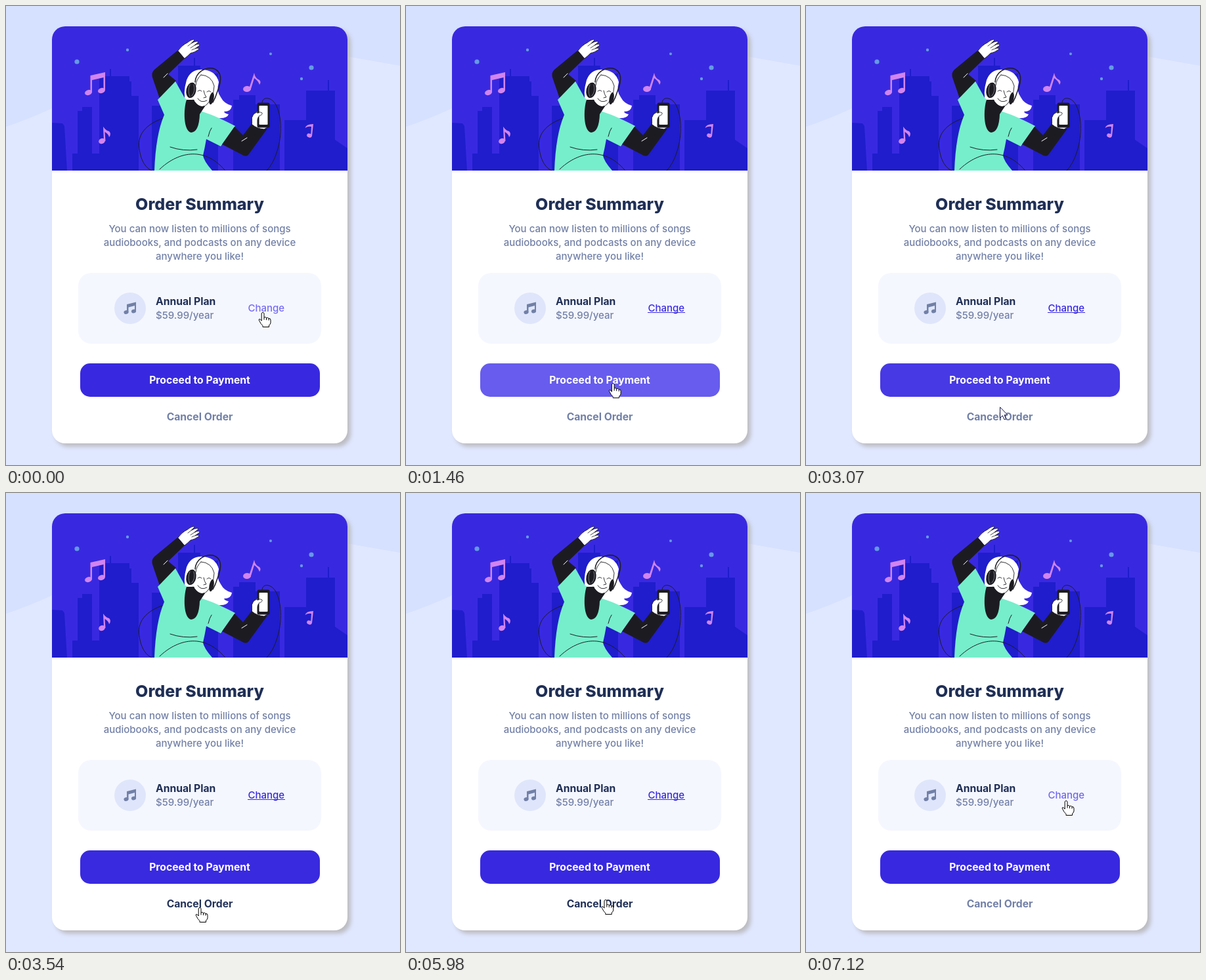
Animation of 600 by 700 pixels, one loop 8530 ms. Source, as an HTML page with a canvas:

```html
<!DOCTYPE html>
<html lang="en">
<head>
<meta charset="utf-8">
<title>Order Summary</title>
<style>
html, body { margin: 0; width: 100%; height: 100%; overflow: hidden; background: #e0e8ff; }
canvas { display: block; }
</style>
</head>
<body>
<canvas id="stage" width="600" height="700"></canvas>
<script>
const ctx = document.getElementById('stage').getContext('2d');
const LOOP = 8530, STEP = 1000 / 15, FADE_RATE = .38;
const BLUE = '#3829e0', VIOLET = '#766cf1', NAVY = '#1f2f56', SLATE = '#7280a7';
const INK = '#1d1b22', WHITE = '#ffffff', TEAL = '#76eecb', PINK = '#d284f0';

function shape(d, fill, stroke, width = 1) {
  const path = new Path2D(d);
  if (fill) { ctx.fillStyle = fill; ctx.fill(path); }
  if (stroke) { ctx.strokeStyle = stroke; ctx.lineWidth = width; ctx.stroke(path); }
}

const line = (d, width = 1) => shape(d, null, INK, width);

function box(x, y, w, h, r, fill) {
  ctx.beginPath();
  ctx.roundRect(x, y, w, h, r);
  ctx.fillStyle = fill;
  ctx.fill();
}

function oval(x, y, rx, ry, tilt, fill) {
  ctx.beginPath();
  ctx.ellipse(x, y, rx, ry, tilt, 0, Math.PI * 2);
  ctx.fillStyle = fill;
  ctx.fill();
}

function text(str, x, y, color, font, align = 'center') {
  ctx.font = font + ' Inter, sans-serif';
  ctx.textAlign = align;
  ctx.fillStyle = color;
  ctx.fillText(str, x, y);
}

const TITLE = '800 25px', BODY = '500 15px', BOLD = '700 15.7px';

function mix(from, to, k) {
  const part = (hex, i) => parseInt(hex.slice(i, i + 2), 16);
  return `rgb(${[1, 3, 5].map(i => Math.round(part(from, i) + (part(to, i) - part(from, i)) * k))})`;
}

// Pointer path: each move slows down towards its end, some bend towards a point
const HOME = [392, 468];
const MOVES = [
  { at: 1060, for: 700, to: [294, 588], bend: [360, 560] },
  { at: 2860, for: 660, to: [296, 633] },
  { at: 3790, for: 170, to: [297, 642] },
  { at: 4440, for: 100, to: [297, 636] },
  { at: 5966, for: 663, to: [391, 474], bend: [335, 562] },
  { at: 6805, for: 55, to: [397, 470] }
];

function pointerAt(time) {
  let pos = HOME;
  for (const move of MOVES) {
    if (time < move.at) break;
    const k = 1 - (1 - Math.min(1, (time - move.at) / move.for)) ** 2;
    const from = pos;
    const mid = move.bend || from.map((v, i) => (v + move.to[i]) / 2);
    pos = from.map((v, i) => (1 - k) ** 2 * v + 2 * k * (1 - k) * mid[i] + k * k * move.to[i]);
  }
  return pos;
}

function hoveredAt(y) {
  if (y < 473) return 'change';
  if (y >= 545 && y <= 596) return 'button';
  if (y >= 614 && y <= 640) return 'cancel';
  return null;
}

// Replays the hover fades from the start of the loop up to the given time
function stateAt(time) {
  const glow = { change: 1, button: 0, cancel: 0 };
  let pos, hovered;
  for (let step = 0; step <= Math.floor((time + 21) / STEP); step++) {
    pos = pointerAt(step * STEP);
    hovered = hoveredAt(pos[1]);
    for (const name in glow) glow[name] += ((name === hovered) - glow[name]) * FADE_RATE;
  }
  return { pos, hovered, glow };
}

function drawBackdrop() {
  ctx.fillStyle = '#e0e8ff';
  ctx.fillRect(0, 0, 600, 700);
  shape('M0 0H600V91Q560 84 520 77L70 156Q36 172 0 184Z', '#d6e1ff');
  ctx.save();
  ctx.shadowColor = '#bcbcc2';
  ctx.shadowBlur = 6;
  ctx.shadowOffsetX = ctx.shadowOffsetY = 5;
  box(70, 31, 450, 636, 20, WHITE);
  ctx.restore();
}

function drawSkyline() {
  box(70, 31, 450, 220, 0, BLUE);
  shape(`M70 251V178L86 179 89 183 93 251H101V225H109V160H116V154H131V225H142V107H158V96H160V107H188
    V115H191V137H202V251H222V152H262V91H286V79H288V91H296V103H323V251H346V143H355V136H380V150H417
    V251H424V174H457V129H490V113H492V129H501V204L520 217V251Z`, '#1f1dcc');
  for (const [x, y, r] of [[108, 85, 3.6], [185, 67, 2.2], [403, 73, 2], [465, 94, 3.6], [450, 111, 2.2]])
    oval(x, y, r, r, 0, '#659ae6');
}

function drawNotes() {
  oval(125.5, 132, 5.6, 4, -.3, PINK);
  oval(145.5, 129, 5.6, 4, -.3, PINK);
  shape('M128.500 106L151 101V128H148.500V109L131 113V132H128.500Z', PINK);
  oval(367, 126.5, 6, 4.4, -.1, PINK);
  shape('M370 126L378 102Q379 110 386 113Q389 116 386 120Q384 114 378 110L372.5 128Z', PINK);
  oval(146, 206, 5, 4, -.4, PINK);
  shape('M149 206L148 184Q152 190 157 191Q161 195 157 200Q156 195 150.5 192L151.5 206Z', PINK);
  oval(462, 197.5, 4, 3, .4, PINK);
  shape('M464 198L465 184Q460 183 455.5 186Q457 180 468 180L466 198Z', PINK);
}

function drawDancer() {
  ctx.lineCap = ctx.lineJoin = 'round';
  line('M252 168C222 174 201 190 202.5 213C204 234 212 247 222 251');
  line('M390 148C390 138 403 138 410 149C420 165 421 196 413 221Q407 241 397 251');

  // Raised arm
  shape('M261 68L226 97Q221 102 223 109L234 141 259 114 247 104 272 80Z', INK);
  shape('M240 109L246 103', null, WHITE);
  shape(`M262 68Q269 59 276 56Q285 49 287 52L282 57Q291 52 293 55L287 60Q295 56 295 60L288 65
    Q294 63 294 66Q287 71 281 72Q277 76 272 80Z`, WHITE, INK, .9);
  line('M282 57L277 61M287 60L281 64M288 65L283 67', .8);

  // Hair, shirt and collar
  shape(`M297 97Q281 97 275 113Q269 133 274 150L296 162Q309 177 326 171Q337 171 339 165
    Q333 164 332 161Q343 161 344 152Q332 149 327 139Q320 130 324 116Q319 97 297 97Z`, WHITE);
  shape(`M258 115L231 143 241 166Q228 196 226 251H314Q301 236 300 228Q303 215 305 203L327 214 349 183
    Q330 173 313 166L296 160 272 140Z`, TEAL);
  line('M250 215Q270 222 291 219M234 249C260 224 300 212 333 250M308 199Q310 190 313 186');
  shape('M275 143C270 157 270 191 282 193Q294 192 295 165L303 153 286 143Z', INK);

  // Face
  shape('M289 113Q284 130 287 145Q296 157 304 151Q315 143 317 119Q308 103 297 106Z', WHITE);
  line(`M297 105Q289 113 289 121M297 105Q313 106 317 122Q316 140 306 150Q300 156 293 152Q287 149 285 143
    M292 130Q295 127 298 130M306 131Q309 128 312 131M301 129Q302 135 305 139L301 140M292 141Q297 149 306 144`, .9);
  shape('M285 147Q290 157 298 156Q295 164 286 160Z', INK);

  // Headphones
  line('M288 116C289 101 303 93 315 95C329 99 329 113 322 130Q319 140 315 147', 1.5);
  oval(282, 128.5, 7.5, 12, .2, INK);
  shape('M280 120Q276 129 280 138M286 120Q289 130 283 137', null, '#8c8a96', .8);
  oval(313, 141, 3.4, 9.5, .2, INK);

  // Lowered arm, hand and phone
  shape('M348 184L361 197 374 180Q384 189 398 187L369 227Q365 231 358 226L329 211Z', INK);
  shape('M359 206L367 201', null, WHITE);
  shape('M375 181Q373 169 378 164L386 158H400V184L393 188Q382 187 375 181Z', WHITE, INK, .9);
  box(382.5, 147.5, 19, 38, 2.5, INK);
  box(385.5, 152, 13, 29, 1, WHITE);
  shape('M375 170Q379 162 390 163Q391 166 384 169L380 179 375 181Z', WHITE);
  line('M378 164Q385 160 390 163Q391 166 385 168', .8);
}

function drawHero() {
  ctx.save();
  ctx.beginPath();
  ctx.roundRect(70, 31, 450, 220, [20, 20, 0, 0]);
  ctx.clip();
  drawSkyline();
  drawNotes();
  drawDancer();
  ctx.restore();
}

function drawPlan({ hovered, glow }) {
  box(110, 407, 370, 108, 20, '#f5f7ff');
  oval(189, 461, 24, 24, 0, '#dfe6fb');
  oval(183, 467, 3.6, 2.9, -.2, SLATE);
  oval(194.5, 465.5, 3.6, 2.9, -.2, SLATE);
  shape('M184 455L198 451.5V465.5H196V457L186.5 459.5V467H184Z', SLATE);
  text('Annual Plan', 228, 456, NAVY, BOLD, 'left');
  text('$59.99/year', 228, 477, SLATE, BODY, 'left');

  const color = mix(BLUE, VIOLET, glow.change);
  text('Change', 396.25, 466, color, BODY);
  if (hovered !== 'change') box(368, 467, 57, 1, 0, color);
}

function drawPointer(x, y, isHand) {
  ctx.save();
  if (isHand) {
    ctx.translate(x - 1, y - 1);
    shape(`M-1.8 1.5Q0 -1 2 1.5V8Q4 6.5 5.5 8.5Q8 7.5 9 9.5Q12 9 12 12V16Q12 18 9.5 20V22.5H0V20.5
      Q-3 18 -5 13.5Q-7 10.5 -5 10.5Q-3.5 10.5 -1.8 13Z`, WHITE, '#000');
    shape('M2 8V11.5M5.5 8.5V12M9 9.5V12.5', null, '#000');
  } else {
    ctx.translate(x, y);
    shape('M.5 0V16.5L4.3 13 7 19 9.5 18 7 12H12Z', WHITE, '#15154a');
  }
  ctx.restore();
}

function draw(time) {
  const state = stateAt(time % LOOP);
  drawBackdrop();
  drawHero();
  text('Order Summary', 295, 311, NAVY, TITLE);
  const pitch = ['You can now listen to millions of songs', 'audiobooks, and podcasts on any device', 'anywhere you like!'];
  pitch.forEach((row, i) => text(row, 295, 345 + 21 * i, SLATE, BODY));
  drawPlan(state);
  box(113, 545, 365, 51, 15, mix(BLUE, VIOLET, state.glow.button));
  text('Proceed to Payment', 295, 576, WHITE, BOLD);
  text('Cancel Order', 295, 632, mix(SLATE, NAVY, state.glow.cancel), BOLD);
  drawPointer(...state.pos, state.hovered);
}

const start = performance.now();
function tick() {
  draw(performance.now() - start);
  requestAnimationFrame(tick);
}
tick();
</script>
</body>
</html>
```
